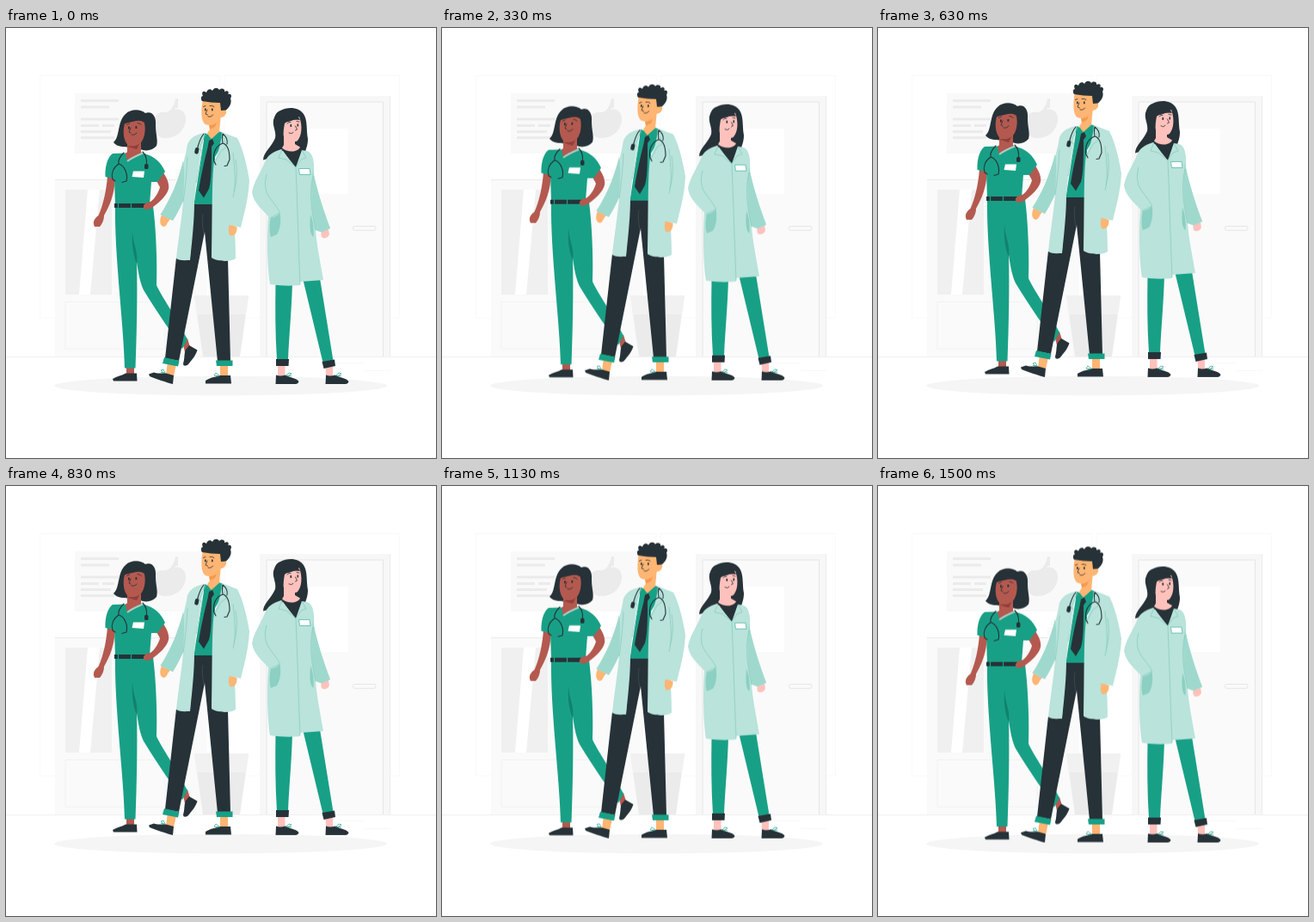
Animation, 500 px wide and 500 px high, one loop 1540 ms. Source, as an HTML page without scripts:

```html
<!DOCTYPE html>
<html lang="en">
<head>
<meta charset="utf-8">
<title>Medical team</title>
<style>
html, body { margin: 0; width: 100%; height: 100%; overflow: hidden; background: #fff; }
svg { display: block; width: 100%; height: 100%; }
.green { fill: #18a086; }
.deep { fill: #11826c; }
.coat { fill: #b9e3db; }
.sleeve { fill: #9fd9cd; }
.pocket { fill: #8bd0c2; }
.dark { fill: #263238; }
.brown { fill: #b4594f; }
.tan { fill: #ffb573; }
.pink { fill: #ffc1bc; }
.white { fill: #fff; }
.line { fill: none; stroke: #263238; stroke-linecap: round; stroke-linejoin: round; }
.thin { stroke-width: .8; }
.tube { stroke-width: 1.1; }
.seam { fill: none; stroke: #86cbbd; stroke-width: .7; }
.lace { fill: none; stroke: #18a086; stroke-width: .7; }

/* Linear bob of 10px, drawn at 37 poses per loop */
.team { animation: bob 1540ms -4ms infinite; }
@keyframes bob {
  0% { transform: translateY(0); animation-timing-function: steps(18); }
  48.648% { transform: translateY(-9.73px); animation-timing-function: step-end; }
  48.649% { transform: translateY(-9.19px); animation-timing-function: steps(19); }
  100% { transform: translateY(1.08px); }
}
</style>
</head>
<body>
<svg viewBox="0 0 500 500">
  <defs>
    <g id="shoe">
      <path class="dark" d="M314 403.500C318 405 321 404.500 325 403.500C330 406.500 338 407 340.500 411C340 413.500 338 414 335 414H313.500Z"/>
      <path class="lace" d="M325 405l4-4 3 1-5 3 5-.5"/>
    </g>
  </defs>

  <g id="room">
    <path d="M39.500 55.500H249V337H39.500ZM254 55.500H457.500V337H254Z" fill="none" stroke="#f7f7f7" stroke-width=".7"/>
    <path d="M80 76H238V146H80Z" fill="#f9f9f9"/>
    <path d="M87 84.500h44M87 92h33M87 106h44M87 113.500h21M112 113.500h14M87 120.500h35M87 127.500h39" stroke="#ebebeb" stroke-width="2.800"/>
    <path d="M197 82C200 88 199 92 196 95C204 93 210 99 209 108C207 121 197 128 185 128C177 128 172 122 172 113C171 103 176 97 183 98C190 99 195 93 197 82Z" fill="#ebebeb"/>
    <path d="M198.500 82v11" stroke="#ebebeb" stroke-width="3"/>
    <path d="M57 176H198V382H57Z" fill="#fafafa"/>
    <path d="M57 176.500H198" stroke="#ebebeb"/>
    <path d="M197 164H234V382H186V178H197Z" fill="#fafafa"/>
    <path d="M69 188H123V310H69Z" fill="#f0f0f0"/>
    <path d="M95 188h14l-11 122H85Z" fill="#fff"/>
    <path d="M69 318.500H185V373H69Z" fill="none" stroke="#f0f0f0" stroke-width=".8"/>
    <path d="M219 311H282L272 382H229Z" fill="#ebebeb"/>
    <path d="M219 311H282L279 333H222Z" fill="#f1f1f1"/>
    <path d="M295 79H447V382H295Z" fill="#f7f7f7"/>
    <path d="M303 382V86H438.500V382" fill="#fafafa" stroke="#e6e6e6"/>
    <path d="M446.500 79V382" stroke="#ebebeb"/>
    <path d="M343 117H398V193H343Z" fill="#fff"/>
    <rect x="403.500" y="230.500" width="26.500" height="4.800" rx="2" fill="#fafafa" stroke="#e0e0e0" stroke-width=".8"/>
    <path d="M0 382.500H500" stroke="#ebebeb" stroke-width=".7"/>
    <path d="M385 389.500h31M417 398.500h30" stroke="#f3f3f3" stroke-width=".6"/>
    <ellipse cx="249.500" cy="416" rx="193.500" ry="11.300" fill="#f5f5f5"/>
  </g>

  <g class="team">
    <g id="nurse">
      <path class="dark" d="M139 100C145 94 156 94 162 99C170 96 175 103 174 113C174 124 177 130 175 137C171 142 163 144 156 141L138 138C132 138 127 136 125 133C133 126 129 109 139 100Z"/>
      <path class="brown" d="M205 364L211 361 214 371 208 377ZM140 393H149V403H140Z"/>
      <path class="dark" d="M124 408C129 405 135 404 139 401.500H152L152.500 410.500H125ZM213 369L222.500 374.500C220 382 216 386 212 391C210 393 206 394 206 390C208 385 207 377 209 374Z"/>
      <path class="green" d="M127 207H171C175 238 176 280 175 299C180 311 198 336 211 362L205 373C193 355 174 328 162 308C156 299 154 285 152 272C153 310 152 355 150.500 395.500H138C137 345 126 265 127 207Z"/>
      <path class="deep" d="M147 237C148 253 154 260 152 274C148 265 146 252 147 237Z"/>
      <path class="brown" d="M118 171L126.500 174C127 191 121 206 114 218C114 224 111 229 109 231L103 231C100 226 103 221 107.500 218C113 206 117 188 118 171ZM174 176L182 167C188 175 190 182 189 187C187 195 178 203 171 208C167 211 162 212 160 209C159 205 164 202 168 202C173 199 178 190 179 185Z"/>
      <path class="green" d="M140 145.500L124 146C118 150 115 161 115.500 173L126 175.500 127 205H167L169 179H176L185 167C180 156 173 149 159 145.500Z"/>
      <path class="dark" d="M126 204H168V209H126Z"/>
      <path d="M130.500 204V209M145.500 204V209" stroke="#18a086" stroke-width="1.200"/>
      <path class="brown" d="M160 209C159 205 163 202.500 168 202L171 208C167 211 162 212 160 209Z"/>
      <path class="brown" d="M141 130H157V144L159 146 141 155 139 146 141 144Z"/>
      <path d="M159 145.500C153 148 146 151 141 155" fill="none" stroke="#a9cfc8" stroke-width="2"/>
      <path d="M142 137C148 138 154 135 157 131L152 141 142 138Z" fill="#8f3f3b"/>
      <path class="brown" d="M138 111L160 106C163 115 162 127 157 133C152 138 144 139 140 134C136 128 136 118 138 111Z"/>
      <path class="dark" d="M137 112C139 103 150 102 161 104L168 111C165 118 164 126 162 131C162 123 163 115 161 110C156 106 145 107 137 112Z"/>
      <path class="line thin" d="M140.500 112.500l3-1.500M153 110.500q3 0 4 2M145 116l-2 5 2 1M146 124q4 1 6-2"/>
      <path class="dark" d="M142 114.500h1.700v3H142ZM150.500 114h1.700v3H150.500Z"/>
      <path class="white" d="M148 166.500H161L160 174 146.500 173Z"/>
      <path class="line tube" d="M137 145C132 150 130 154 131 158C124 163 122 170 124 176L127 178M131 158C138 160 142 170 140 178L135 179.500M159 144C163 148 164 153 163.500 159"/>
      <rect class="dark" x="161" y="158" width="4.500" height="6" rx="1.500"/>
    </g>

    <g id="doctor">
      <path class="tan" d="M188 388L198 391 195 405 186 403ZM249 390H258V406H249ZM183 214L192 221C187 226 187 231 183 231C179 230 177 223 183 214Z"/>
      <path class="dark" d="M166 402.500L172 400.500C178 403 184 400 188 402L195 404 194 414C186 412 175 408 167 405ZM232 410C238 406 244 406 249 404H261L262 413.500H232Z"/>
      <path class="lace" d="M184 402l-4-4 3-1 2 4-5-.5M247 405l-5-1 2-3 4 3-4 1"/>
      <path class="dark" d="M217 203H241V268H258L261 388H246L231 237 201 387 185 384 198 267 214 268Z"/>
      <path d="M230.500 240C228 230 228 223 229 216" fill="none" stroke="#455158" stroke-width=".7"/>
      <path class="green" d="M184 383L201.500 387 200 393.500 182 390ZM244 386.500H263.500V393H245ZM231 124L252 121 249 140 243 150V205H218.500Z"/>
      <path class="tan" d="M238 106L250 100 248 121 238 130 234 122C238 118 239 113 238 106Z"/>
      <path d="M236 113C241 113 245 109 247 105L243 115 237 118Z" fill="#f59a4c"/>
      <path class="green" d="M232 122L239 129 232 138 229 126ZM239 129L249 120 252 126 244 137Z"/>
      <path class="dark" d="M236 131L240 129 242 134 239 138C239 160 239 177 236 187L230 197.500 224 189C227 170 231 153 234.500 139Z"/>
      <path class="coat" d="M231 122C220 124 215 127 211 135C207 162 195 193 179.500 217L194 224C199 216 203 208 206 202C204 224 200 248 198 268C202 271 209 270 214 270C217 242 219 222 219 202C221 176 225 150 231 122Z"/>
      <path class="sleeve" d="M206 154C200 178 191 200 179.500 217L194 224C200 214 204 206 206 200C207 185 208 168 206 154Z"/>
      <path class="coat" d="M251 121L269 128C276 141 281 164 283 177C282 200 276 218 273 232L258 228C263 217 264 207 264 196C265 222 267 245 267 268C262 272 246 272 239 267C240 220 239 176 242 155C247 145 250 134 251 121Z"/>
      <path class="tan" d="M259.500 229L268.500 231C269 238 266 242 261 241.500C258 239 259 233 259.500 229Z"/>
      <path class="seam" d="M211 150C210 170 208 190 206 202M264 145C266 165 268 182 264 197M267 153C270 171 267 183 265 191M232 124L224 140 228 143 221 180M251 123L256 139 250 143 242 158"/>
      <path class="tan" d="M229 82L251 84 251 95C255 93 258 97 255 101C253 104 250 104 249 104C247 111 239 115 232 112C226 108 227 94 229 82Z"/>
      <path class="dark" d="M228 85C226 82 227 79 229 79C227 75 229 72 233 75C234 71 238 70 240 73C242 69 246 69 248 72C251 69 255 71 254 74C258 72 260 75 258 77C262 76 263 79 261 82C263 87 260 92 256 95.500L250 96 249 87C242 87 235 86 228 85Z"/>
      <path class="line thin" d="M229.500 91.500l2.500-1M237 90.500q3-1 5 1M234 95l-2 5 2.500 1M235 103q4 1 5.500-2"/>
      <path class="dark" d="M231 93.500h1.600v2.800H231ZM239 93.500h1.600v2.800H239Z"/>
      <path class="line tube" d="M230 123C225 129 224 135 222.500 140M252 123C251 127 251 130 252 134C244 137 241 145 241.500 154L244 159M252 134C259 136 260 145 260 153L257 160L254 160.500M252 123C256 126 258 130 257 135"/>
      <rect class="dark" x="219.500" y="139" width="4.500" height="7.500" rx="2" transform="rotate(12 222 143)"/>
    </g>

    <g id="colleague">
      <path class="dark" d="M319 96C328 91 341 92 346 100C351 108 349 118 351 129C351 136 349 140 348 144L322 143C314 143 309 152 299 153.500C299 145 309 138 313 128C315 120 308 112 312 104C314 99 316 97 319 96Z"/>
      <path class="pink" d="M316 390H324.500V405H316ZM371.500 391L380 390 380 405H372ZM368 233L375 234 376 240C374 245 369 245 367 243C366 240 366 237 368 233Z"/>
      <use href="#shoe"/>
      <use href="#shoe" x="58"/>
      <path class="green" d="M313.500 296H333C332 330 329 360 328 386H315C313 355 313 325 313.500 296ZM345 291H365L380.500 387 368.500 389Z"/>
      <path class="dark" d="M314 385H329L328.500 393H314ZM367.500 388L382 385.500 383 393 369.500 396Z"/>
      <path class="dark" d="M320 140H345L337 164Z"/>
      <path class="pink" d="M323 124H336V135L342 138.500C339 145 327 145 321 139.500L323 136Z"/>
      <path class="coat" d="M320 141C310 144 304 148 301 156C296 168 288 179 286 191C288 204 299 212 305 219C303 247 304 279 307 298C319 300 333 300 342 299V295L369 293C365 270 361 250 360 235L367 237.500 377 233C370 215 362 190 358 171C359 155 357 145 350 143L344 142 337 162Z"/>
      <path class="sleeve" d="M357 165C361 188 370 214 377 233L367 237.500 360 235C355 212 354 190 357 165Z"/>
      <path class="pocket" d="M308 221C313 220 317 217 318.500 215C320 224 319 234 315 240L308 243C306 238 306 228 308 221ZM354 217C358 226 358 237 357.500 243C353 240 353 230 354 217Z"/>
      <path class="seam" d="M337 162C339 207 340 254 342 298M303 170C300 181 302 189 304 193C309 202 316 208 318.500 215L307 221M357 172C353 190 354 208 360 235M321 141L317 151 326 153 337 162M344 142L349 151 343 153 337 162"/>
      <path class="pink" d="M323 110C329 109 338 106 341 103C345 114 344 125 339 131C334 134 326 132 323 127C320 122 321 115 323 110Z"/>
      <path class="dark" d="M317 122C315 111 322 102 331 102C337 101 340 102 342 107C335 106 327 108 324 111C323 117 322 122 323 128Z"/>
      <path class="line thin" d="M327 111q2-2.500 4-1.500M338 108.500l3 .5M336.500 114l2 4-2 1M329 122q3 2 5-.5"/>
      <path class="dark" d="M330.500 112h1.600v3H330.500ZM338.500 111.500h1.600v3H338.500Z"/>
      <path class="white" d="M340.500 163.500H353L354 170.500H341.500Z" stroke="#54b9a6" stroke-width=".8"/>
    </g>
  </g>
</svg>
</body>
</html>
```
